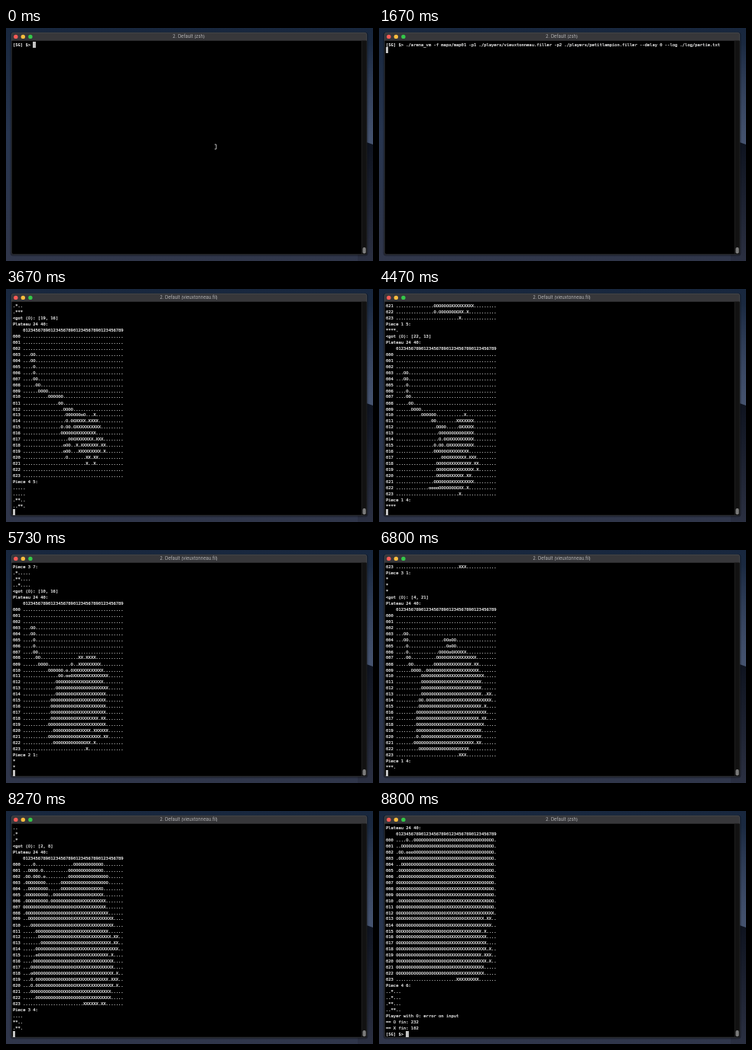
These frames come from a looping animation (480x306 px, 9470 ms). An HTML page:

```html
<!DOCTYPE html>
<html lang="en">
<head>
<meta charset="utf-8">
<title>Terminal game</title>
<style>
html, body { margin: 0; width: 100%; height: 100%; overflow: hidden; background: #10151f; }
#stage { position: absolute; left: 0; top: 0; width: 480px; height: 306px; overflow: hidden; }
svg { position: absolute; left: 0; top: 0; }
/* Laid out about ten times larger so that tiny glyphs keep exact advances. */
.fine { position: absolute; margin: 0; transform: scale(.0996); transform-origin: 0 0; white-space: pre; }
#title { left: 6.5px; top: 6.4px; width: 4660px; text-align: center; color: #b8b8ba;
  font: 58px/100px Inter, Roboto, sans-serif; }
#out { left: 9px; top: 17.5px; color: #ececec; -webkit-text-stroke: 2px #ececec;
  font: 54.82px/80.1px "DejaVu Sans Mono", "Liberation Mono", monospace; }
#out b { color: #fff; -webkit-text-stroke: 0; }
#cursor { position: absolute; width: 3.4px; height: 8px; background: #c4c4c4; }
</style>
</head>
<body>
<div id="stage">
  <svg width="480" height="306">
    <defs>
      <linearGradient id="sky" x2="0" y2="1">
        <stop offset="0" stop-color="#18273e"/>
        <stop offset=".45" stop-color="#27354f"/>
        <stop offset="1" stop-color="#30364a"/>
      </linearGradient>
      <linearGradient id="dune" x2="0" y2="1">
        <stop offset="0" stop-color="#0e131f"/>
        <stop offset="1" stop-color="#2b3042"/>
      </linearGradient>
      <linearGradient id="glow" x2="0" y2="1">
        <stop offset="0" stop-color="#45536f" stop-opacity="0"/>
        <stop offset="1" stop-color="#45536f"/>
      </linearGradient>
    </defs>
    <rect width="480" height="306" fill="url(#sky)"/>
    <rect x="465" y="20" width="15" height="134" fill="url(#glow)"/>
    <path d="M480 153Q470 148 460 150V306H480Z" fill="url(#dune)"/>
    <rect x="5.500" y="5.500" width="468" height="294" rx="4" fill="#000" opacity=".3"/>
    <rect x="7" y="6" width="465" height="291.500" rx="2.500" fill="#000"/>
    <path d="M7 16.800V8.500Q7 6 9.500 6H469.500Q472 6 472 8.500V16.800Z" fill="#37373a"/>
    <rect x="7.250" y="6.250" width="464.500" height="291" rx="2.400" fill="none" stroke="#55565a" stroke-width=".5"/>
    <circle cx="12.800" cy="11.400" r="2.700" fill="#fc5b57"/>
    <circle cx="22.300" cy="11.400" r="2.700" fill="#fdbd3f"/>
    <circle cx="31.900" cy="11.400" r="2.700" fill="#34c84a"/>
    <rect x="465" y="16.800" width="6.500" height="280" fill="#121212"/>
    <rect x="464.800" y="16.800" width=".5" height="280" fill="#303030"/>
    <rect x="466.500" y="288" width="4.200" height="8.200" rx="2" fill="#7c7c7c"/>
    <path id="pointer" d="M272.800 153H275V159H272.800" fill="none" stroke="#ccc" stroke-width=".9"/>
  </svg>
  <div id="title" class="fine"></div>
  <pre id="out" class="fine"></pre>
  <div id="cursor"></div>
</div>
<script>
const LOOP = 9470, START = 2070, TICK = 200 / 3;
const W = 40, H = 24, LINES = 35, CHAR = 3.287, LINE = 7.98;
const PROMPT = '[SG] $> ';
const COMMAND = './arena_vm -f maps/map01 -p1 ./players/vieuxtonneau.filler' +
  ' -p2 ./players/petitlampion.filler --delay 0 --log ./log/partie.txt';

// Board states; each one adds its pieces to the state before it.
const states = [
  { tick: 0, first: 3, art: '...O' + '\n'.repeat(16) + '.'.repeat(32) + 'X' },
  { tick: 12, got: '12, 17', last: ['*.....', '*.....'], next: ['....*', '....*', '...**', '.....'], first: 3, art:
`...OO
...OO
....O
....O
....OO
.....OO
......OOOO
..........OOOOOO
..............OO
................Oo
.................o
.....................X.X
.....................XXX....X
.....................X.X.XXX
.....................X.XXX...XXX
.........................XXXXX.XX
...........................XX...X` },
  { tick: 36, got: '22, 13', last: ['****.'], next: ['****'], first: 10, art:
`..........OOOOOO...........X
..............OO........XXXXXXX
................OOOO.....OXXXXX
.................OOOOOOOOOOOXXX
.................O.OOXXXXXXXXXX
...............O.OO.OXXXXXXXXXX
...............OOOOOOXXXXXXXX
..................OOOXXXXXXX.XXX
................OOOOOXXXXXXXXX.XX
................OOOOOXXXXXXXXXX.X
................OOOOOXXXXXX.XX
...............OOOOOOOXXXXXXXXX
.............ooooOOOOOOOOXX.X
.........................X` },
  { tick: 55, got: '10, 16', last: ['.*.....', '.**....', '..*....'], next: ['*', '*'], first: 8, art:
`.....OO...............XX.XXXX
......OOOO.........O..XXXXXXXXX
..........OOOOOO.o.OXXXXXXXXXXXX
..............OO.ooOXXXXXXXXXXXXXX
.............OOOOOoOXXXXOOXXXXXX
.............OOOOOOOOOOOOOOOXXXXXX
.............OOOOOOOOXXXXXXXXXXXX
...........OOOOOOOOOOXXXXXXXXXXXX
...........OOOOOOOOOOXXXXXXXXXXXX
...........OOOOOOOOOOXXXXXXXXXXXX
...........OOOOOOOOOOXXXXXXXXX.XX
..........OOOOOOOOOOOXXXXXXXXXXXX
............OOOOOOOOOXXXXXX.XXXXXX
..........OOOOOOOOOOOOXXXXXXXXX.XX
............OOOOOOOOOOOOOXX.X` },
  { tick: 71, got: '4, 21', last: ['*', '*', '*'], next: ['***.'], first: 4, art:
`...OO..............OOoOO
....O...............OoOO
....O............OOOOoOXXXXX
....OO..........OOOOOXXXXXXXXXXX
.....OO........OOOOOXXXXXXXXXX.XX
......OOOO..OOOOOOOOXXXXXXXXXXXXX
..........OOOOOOOOOOXXXXXXXXXXXXXXX
..........OOOOOOOOOOXXXXXXXXXXXXXX
..........OOOOOOOOOOXXXXOOXXXXXXXX
..........OOOOOOOOOOOOOOOOOOXXXXXX..XX
.........OO.OOOOOOOOOXXXXXXXXXXXXXXXXX
.........OOOOOOOOOOOOXXXXXXXXXXXXX.X
........OOOOOOOOOOOOOXXXXXXXXXXXXXXX
........OOOOOOOOOOOOOXXXXXXXXXXXX.XX
........OOOOOOOOOOOOOXXXXXXXXXXXXXX
........OOOOOOOOOOOOOXXXXXXXXXXXXX
........O.OOOOOOOOOOOXXXXXXXXXXXXX
.......OOOOOOOOOOOOOOOXXXXXXXXX.XX
.........OOOOOOOOOOOOOOOOXXXX
.........................XXX` },
  { tick: 84, got: '2, 28', last: ['*....', '*....', '.....'], next: ['..', '**', '..'], first: 1, art:
`.......................O.OOO
.......................O..OOoO
...OO..................OOOOOoO
...OO..............OOOOOOOOOXX
....O.............OOOOOOOOOOXXXX
....O............OOOOOOXXXXXXXXX
....OO..........OOOOOXXXXXXXXXXX
.....OO........OOOOOXXXXXXXXXXXXX
......OOOO..OOOOOOOOXXXXXXXXXXXXXXXX


..........OOOOOOOOOOXXXXOOXXXXXXXXX
..........OOOOOOOOOOOOOOOOOOXXXXXXX.XX
.........OOOOOOOOOOOOXXXXXXXXXXXXXXXXX


.......OOOOOOOOOOOOOOXXXXXXXXXXXXXXX
........OOOOOOOOOOOOOXXXXXXXXXXXXXXX.X
........OOOOOOOOOOOOOXXXXXXXXXXXXX.XXX
........O.OOOOOOOOOOOXXXXXXXXXXXXXXX.X
.......OOOOOOOOOOOOOOOXXXXXXXXXXXXX
.........OOOOOOOOOOOOOOOOXXXXXXXXXX
........................XXXXXX.XX` },
  { tick: 101, next: ['..*...', '..*...', '.**...', '..**..'], first: 0, art: finalArt() },
];
const LAST_TICK = states.at(-1).tick;

// O floods everything left of X and the whole top right.
function finalArt() {
  const left = ['....O..', '..', '.OO.ooo', '.', '..', '.', '.', '', '', '', '.', ''];
  const xFrom = [0, 0, 0, 0, 28, 28, 23, 21, 20, 20, 20, 20];
  const xTo = [0, 0, 0, 0, 31, 32, 33, 33, 36, 36, 36, 36];
  return Array.from({ length: H }, (_, r) =>
    r < 12 ? left[r].padEnd(xFrom[r], 'O').padEnd(xTo[r], 'X').padEnd(39, 'O')
    : r === 12 ? 'O'.repeat(20) + 'X'.repeat(4) + 'OO' + 'X'.repeat(13)
    : r < 23 ? 'O'.repeat(20)
    : '.'.repeat(24) + 'X'.repeat(9)).join('\n');
}

const random = (a, b) => {
  const v = Math.sin(a * 12.9898 + b * 78.233) * 43758.5453;
  return v - Math.floor(v);
};

function toCells({ first, art }) {
  const rows = Array(first).fill('').concat(art.split('\n'));
  return Array.from({ length: H }, (_, r) => (rows[r] || '').padEnd(W, '.')).join('').split('');
}

// Order in which the new cells of one letter spread from the older ones.
function growth(before, after, letter) {
  const is = (cell) => cell.toUpperCase() === letter;
  const indices = [...before.keys()];
  const old = indices.filter((i) => is(before[i]));
  const row = (i) => Math.floor(i / W), col = (i) => i % W;
  const distance = (i) => Math.min(...old.map((j) =>
    Math.abs(row(i) - row(j)) + Math.abs(col(i) - col(j))));
  return indices.filter((i) => before[i] === '.' && is(after[i]))
    .map((i) => ({ i, rank: distance(i) + 2 * random(row(i), col(i)) }))
    .sort((a, b) => a.rank - b.rank).map(({ i }) => i);
}

states.forEach((state, n) => {
  const own = toCells(state);
  if (!n) { state.cells = own; return; }
  const base = states[n - 1].cells.map((c) => c.toUpperCase());
  state.cells = own.map((c, i) => base[i] === '.' ? c : base[i]);
  state.base = base;
  state.grow = { O: growth(base, state.cells, 'O'), X: growth(base, state.cells, 'X') };
});

function randomPiece(seed) {
  const pick = (n, max) => Math.floor(random(seed, n) * max);
  const h = 1 + pick(1, 4), w = 1 + pick(2, 6);
  const piece = Array.from({ length: h }, () => Array(w).fill('.'));
  let r = pick(3, h), c = pick(4, w);
  for (let step = 0; step < 6; step++) {
    piece[r][c] = '*';
    if (random(seed, 10 + step) < .5) r = Math.min(h - 1, r + 1);
    else c = Math.min(w - 1, c + 1);
  }
  return piece.map((line) => line.join(''));
}

function turnAt(tick) {
  const exact = states.find((s) => s.tick === tick && s.next);
  if (exact) return exact;
  const n = Math.max(1, states.findIndex((s) => s.tick > tick));
  const from = states[n - 1].tick, to = states[n];
  const part = (tick - from) / (to.tick - from);
  const cells = to.base.slice();
  const shown = (letter) => to.grow[letter].slice(0, Math.round(part * to.grow[letter].length));
  for (const i of shown('X')) cells[i] = 'X';
  const os = shown('O');
  os.forEach((i, k) => { cells[i] = k < os.length - 3 ? 'O' : 'o'; });
  const spot = os.length ? os.at(-1) : 3 * W + 3;
  return { cells, got: `${Math.floor(spot / W)}, ${spot % W}`,
    last: randomPiece(2 * tick), next: randomPiece(2 * tick + 1) };
}

const boardLines = (cells) => Array.from({ length: H }, (_, r) =>
  String(r).padStart(3, '0') + ' ' + cells.slice(r * W, r * W + W).join(''));
const pieceLines = (piece) => [`Piece ${piece.length} ${piece[0].length}:`, ...piece];

function gameLines(tick) {
  const { cells, got, last, next } = turnAt(tick);
  const current = [`Plateau ${H} ${W}:`, '    ' + '0123456789'.repeat(4),
    ...boardLines(cells), ...pieceLines(next)];
  if (tick === LAST_TICK) {
    return [...current, 'Player with O: error on input', '== O fin: 232', '== X fin: 102', PROMPT];
  }
  // A new piece overlaps exactly one older cell.
  let fresh = 0;
  const previous = cells.map((c) => c !== 'o' ? c : ++fresh === 3 ? 'O' : '.');
  return [...boardLines(previous), ...pieceLines(last), `<got (O): [${got}]`, ...current, ''].slice(-LINES);
}

function linesAt(t, tick) {
  if (tick >= 0) return gameLines(tick);
  if (t < 330) return [PROMPT];
  return t < 930 ? [PROMPT + COMMAND] : [PROMPT + COMMAND, ''];
}

const [title, out, cursor, pointer] =
  ['title', 'out', 'cursor', 'pointer'].map((id) => document.getElementById(id));
const begin = performance.now();
let drawn = '';

function draw() {
  const t = (performance.now() - begin) % LOOP;
  const tick = Math.min(LAST_TICK, Math.floor((t - START + 7) / TICK));
  const key = tick >= 0 ? tick : `idle ${t >= 330} ${t >= 930}`;
  if (key !== drawn) {
    drawn = key;
    const lines = linesAt(t, tick);
    out.innerHTML = lines.join('\n').replace(/</g, '&lt;').replace(PROMPT, `<b>${PROMPT}</b>`);
    cursor.style.left = 9 + lines.at(-1).length * CHAR + 'px';
    cursor.style.top = 17.5 + (lines.length - 1) * LINE + 'px';
    const playing = tick >= 15 && tick < LAST_TICK;
    title.textContent = `2. Default (${playing ? 'vieuxtonneau.fil' : 'zsh'})`;
    pointer.style.display = t < 330 ? '' : 'none';
  }
  requestAnimationFrame(draw);
}
draw();
</script>
</body>
</html>
```
